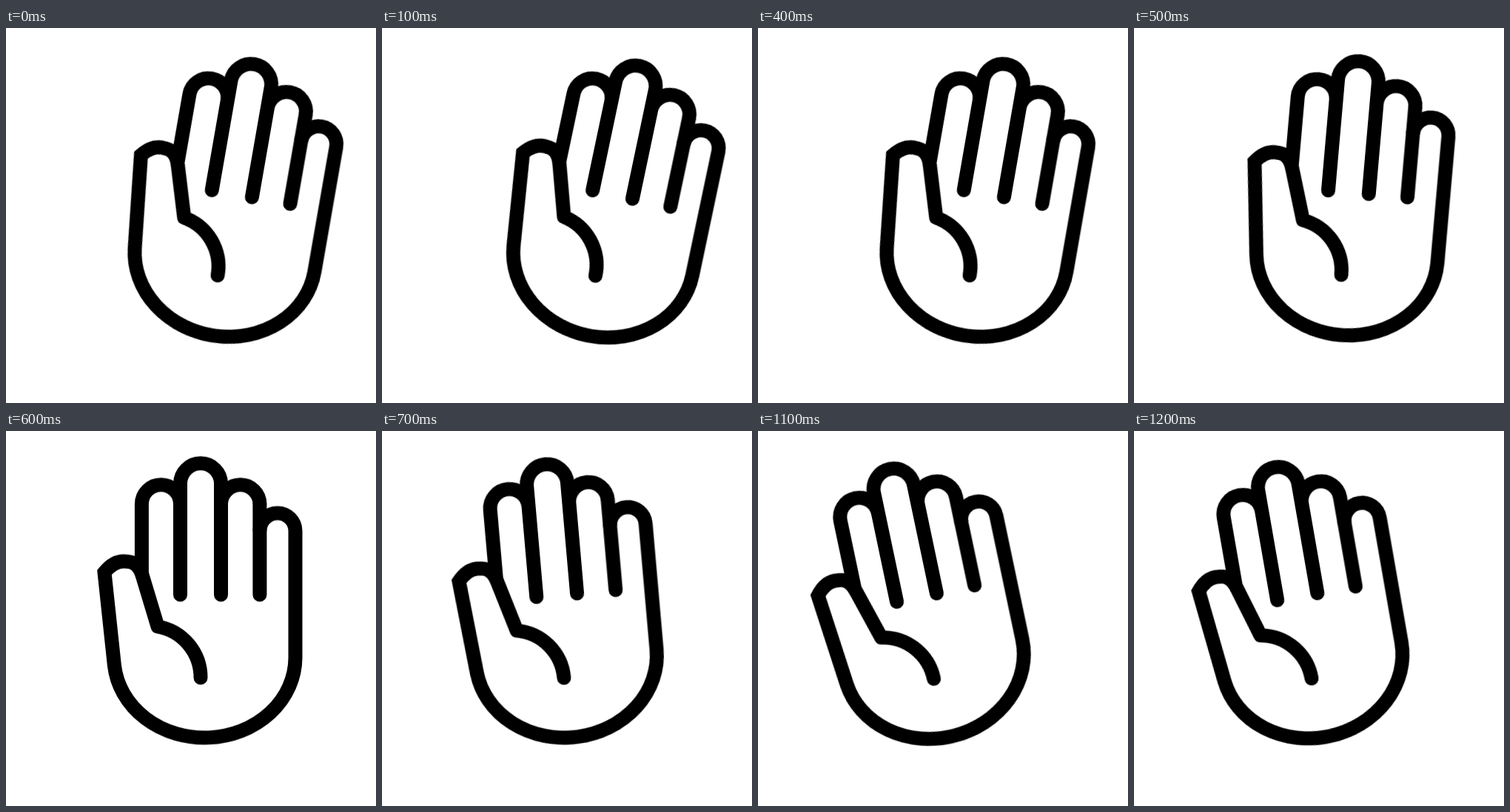
Recreate the animation shown at these times as an HTML page. Size 500x506 px, loop 1300 ms.

```html
<!DOCTYPE html>
<html lang="en">
<head>
<meta charset="utf-8">
<title>Waving hand</title>
<style>
  html, body {
    margin: 0;
    width: 100%;
    height: 100%;
    overflow: hidden;
    background: #fff;
  }
  svg {
    display: block;
    width: 500px;
    height: 506px;
  }
  .hand {
    fill: none;
    stroke: #000;
    stroke-width: 19;
    transform-origin: 0 0;
    animation: wave 1300ms step-end infinite;
  }
  .round {
    stroke-linecap: round;
    stroke-linejoin: round;
  }
  /* Swing about the heel of the palm, which rests 11px to either side of centre. */
  @keyframes wave {
    0%, 30.76%     { transform: translate(274px, 402.8px) rotate(9.9deg); }
    7.69%, 23.07%  { transform: translate(274px, 402.8px) rotate(11.9deg); }
    15.38%         { transform: translate(274px, 402.8px) rotate(12.7deg); }
    38.46%         { transform: translate(274px, 402.8px) rotate(5deg); }
    46.15%         { transform: translate(263px, 402.8px) rotate(0deg); }
    53.84%         { transform: translate(252px, 402.8px) rotate(-5deg); }
    61.53%, 92.3%  { transform: translate(252px, 402.8px) rotate(-9.9deg); }
    69.23%, 84.61% { transform: translate(252px, 402.8px) rotate(-11.9deg); }
    76.92%         { transform: translate(252px, 402.8px) rotate(-12.7deg); }
    100%           { transform: translate(274px, 402.8px) rotate(9.9deg); }
  }
</style>
</head>
<body>
<svg viewBox="0 0 500 506">
  <g class="hand">
    <g transform="translate(0 -70)">
      <!-- little finger, palm, thumb -->
      <path d="M79.9 -198 A24.05 24.05 0 0 1 128 -198 V-27
               A122.6 108.3 0 0 1 -116.6 -16.6 L-130 -142
               C-122 -152 -113 -157 -104 -157 C-90 -157 -83 -152 -78.5 -137"/>
      <!-- index, middle and ring fingertips -->
      <path d="M-79.6 -141 V-234.2 A26.05 26.05 0 0 1 -27.5 -234.2"/>
      <path d="M-27.5 -261.7 A27.5 27.5 0 0 1 27.5 -261.7"/>
      <path d="M27.5 -234 A26.2 26.2 0 0 1 79.9 -234"/>
      <!-- gaps between the fingers, thumb crease -->
      <path class="round" d="M-27.5 -261.7 V-112 M27.5 -261.7 V-112 M79.9 -234 V-112"/>
      <path class="round" d="M-78.5 -137 L-58 -69 A70 70 0 0 1 0 0"/>
    </g>
  </g>
</svg>
</body>
</html>
```
